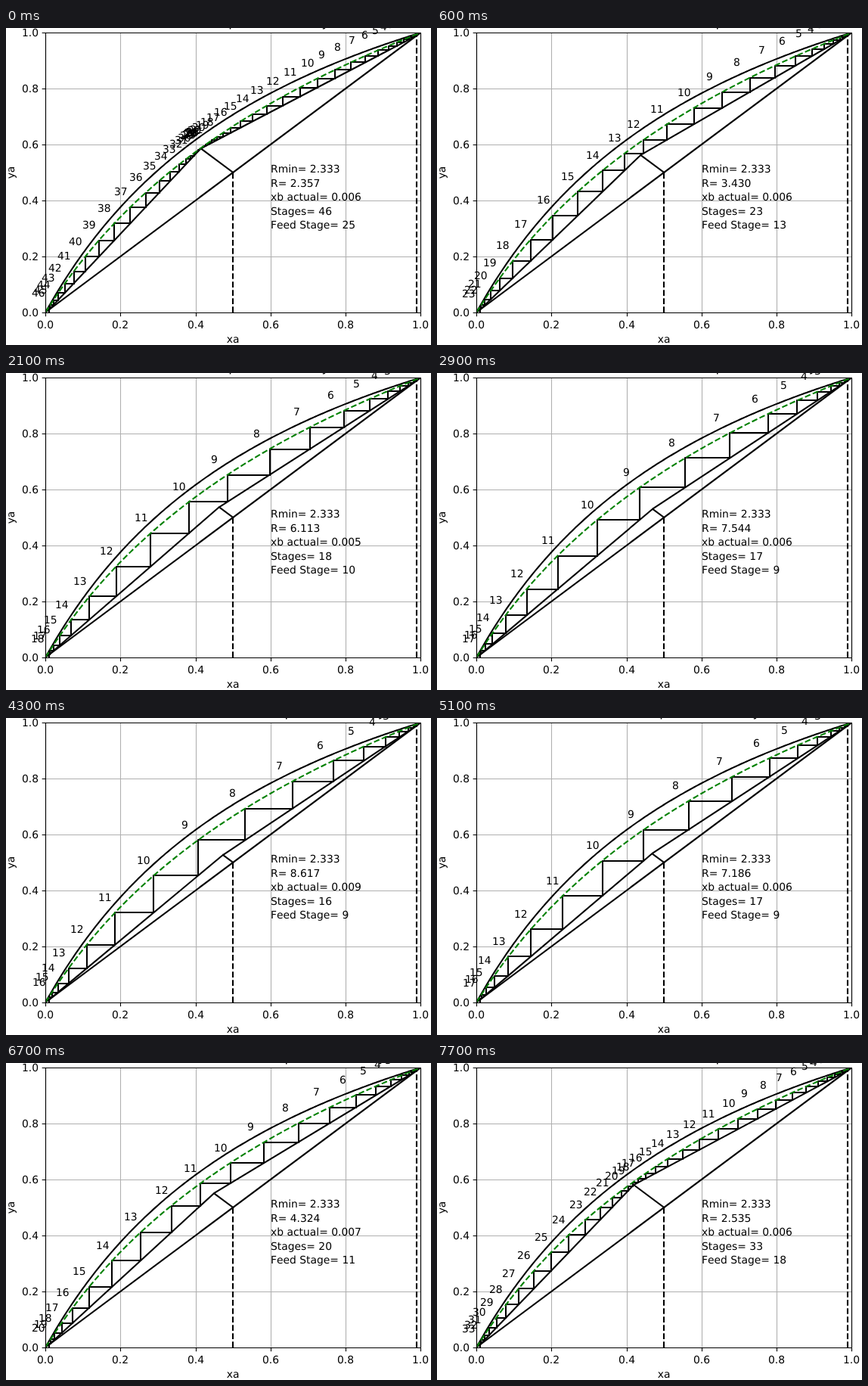
Animation of 562x419 px, one loop 7.8 s. Source, as an HTML page:

```html
<!DOCTYPE html>
<html lang="en">
<head>
<meta charset="utf-8">
<style>
  html, body { margin: 0; width: 100%; height: 100%; overflow: hidden; background: #fff; }
  svg { display: block; }
  text { font: 13.889px "DejaVu Sans", sans-serif; font-kerning: none; text-rendering: geometricPrecision; white-space: pre; }
  .title { font-size: 16.667px; }
  .middle { text-anchor: middle; }
  path { fill: none; stroke: #000; stroke-width: 2.083; stroke-linejoin: round; }
  .solid { stroke-linecap: square; }
  .dashed { stroke-dasharray: 7.708 3.333; }
  .green { stroke: #008000; }
  .thin { stroke-width: 1.111; }
  .grid { stroke: #b0b0b0; }
</style>
</head>
<body>
<svg width="562" height="419" viewBox="0 0 562 419">
  <defs><clipPath id="axes"><rect x="52" y="6" width="496" height="370"/></clipPath></defs>
  <path id="grid" class="thin grid"/>
  <g clip-path="url(#axes)">
    <path id="equilibrium" class="solid"/>
    <path id="diagonal" class="solid"/>
    <path id="operating" class="solid"/>
    <path id="steps" class="solid"/>
    <path id="feedMark" class="dashed"/>
    <path id="topMark" class="dashed"/>
    <path id="bottomMark" class="dashed"/>
    <path id="effective" class="dashed green"/>
  </g>
  <path id="ticks" class="thin"/>
  <path id="frame" class="thin solid"/>
  <g id="axisText"></g>
  <g id="labels"></g>
</svg>
<script>
const STEP_MS = 100, STEPS = 78;
const ALPHA = 2.41186, EFFICIENCY = 0.8, R_MIN = 2.3332;
const TOP = 0.99, FEED = 0.5, BOTTOM = 0.01;
const B = ALPHA - 1;

const $ = id => document.getElementById(id);
const px = x => 52.22 + 496 * x;
const py = y => 375.78 - 369.6 * y;
const snap = v => Math.floor(v + 0.5);
const crisp = v => snap(v) + 0.5;
const line = points => 'M' + points.map(([x, y]) => px(x).toFixed(3) + ' ' + py(y).toFixed(3)).join('L');
const setPath = (id, d) => $(id).setAttribute('d', d);

const equilibrium = x => ALPHA * x / (1 + B * x);
const effective = x => x + EFFICIENCY * (equilibrium(x) - x);

// Inverse of the effective curve: positive root of its quadratic.
function liquidAt(y) {
  const a = B * (1 - EFFICIENCY);
  const b = 1 + EFFICIENCY * B - B * y;
  return (Math.sqrt(b * b + 4 * a * y) - b) / (2 * a);
}

function curve(f) {
  return line(Array.from({ length: 201 }, (_, i) => [i / 200, f(i / 200)]));
}

function text(x, y, content, cls = '', extra = '') {
  return `<text x="${x}" y="${y}" class="${cls}" ${extra}>${content}</text>`;
}

function drawStatic() {
  let grid = '', ticks = '', axis = '';
  for (let i = 0; i <= 5; i++) {
    const v = i / 5, x = crisp(px(v)), y = crisp(py(v)), name = v.toFixed(1);
    grid += `M${x} 6V376M52 ${y}H548`;
    ticks += `M${x} 376.5v4.86M52.5 ${y}h-4.86`;
    axis += text(snap(px(v) - 11), 397, name) + text(21, snap(py(v) + 5), name);
  }
  axis += text(300.2, 416, 'xa', 'middle');
  axis += text(0, 0, 'ya', 'middle', 'transform="translate(11 191) rotate(-90)"');
  setPath('grid', grid);
  setPath('ticks', ticks);
  setPath('frame', 'M52.5 6.5H548.5V376.5H52.5Z');
  setPath('equilibrium', curve(equilibrium));
  setPath('effective', curve(effective));
  setPath('diagonal', line([[0, 0], [1, 1]]));
  const marks = { feedMark: FEED, topMark: TOP, bottomMark: BOTTOM };
  for (const id in marks) {
    setPath(id, `M${snap(px(marks[id]))} ${snap(py(0))}V${snap(py(marks[id]))}`);
  }
  $('axisText').innerHTML = axis;
}

function drawReflux(index) {
  const ratio = 1.01 + index * (2.99 / 39);
  const R = ratio * R_MIN;
  const slope = R / (R + 1), intercept = TOP / (R + 1);
  const feedX = (2 * FEED - intercept) / (slope + 1);
  const feedY = 2 * FEED - feedX;
  const lowerSlope = (feedY - BOTTOM) / (feedX - BOTTOM);
  const operating = x => x > feedX ? slope * x + intercept : BOTTOM + lowerSlope * (x - BOTTOM);

  let x = TOP, y = TOP, stage = 0, feedStage = 0, steps = '', labels = '';
  while (x > BOTTOM && stage < 100) {
    const next = liquidAt(y);
    stage++;
    if (!feedStage && next < feedX) feedStage = stage;
    const nextY = next > BOTTOM ? operating(next) : next;
    steps += `M${snap(px(x))} ${snap(py(y))}H${snap(px(next))}V${snap(py(nextY))}`;
    labels += text(snap(px(next - 0.044)), snap(py(y + 0.0417)), stage);
    x = next;
    y = nextY;
  }

  const info = [
    `Rmin= ${R_MIN.toFixed(3)}`,
    `R= ${R.toFixed(3)}`,
    `xb actual= ${x.toFixed(3)}`,
    `Stages= ${stage}`,
    `Feed Stage= ${feedStage}`
  ];
  info.forEach((row, i) => { labels += text(350, snap(191 + 18.5 * i), row); });
  labels += text(300, -2, `${ratio} Rmin: stepwise efficiency`, 'title middle');

  setPath('operating', line([[TOP, TOP], [feedX, feedY], [BOTTOM, BOTTOM]]) +
    line([[FEED, FEED], [feedX, feedY]]));
  setPath('steps', steps);
  $('labels').innerHTML = labels;
}

let shown = -1;
const start = performance.now();
function tick() {
  const i = Math.floor((performance.now() - start) / STEP_MS) % STEPS;
  const index = Math.min(i, STEPS - i);
  if (index !== shown) drawReflux(shown = index);
  requestAnimationFrame(tick);
}
drawStatic();
tick();
</script>
</body>
</html>
```
